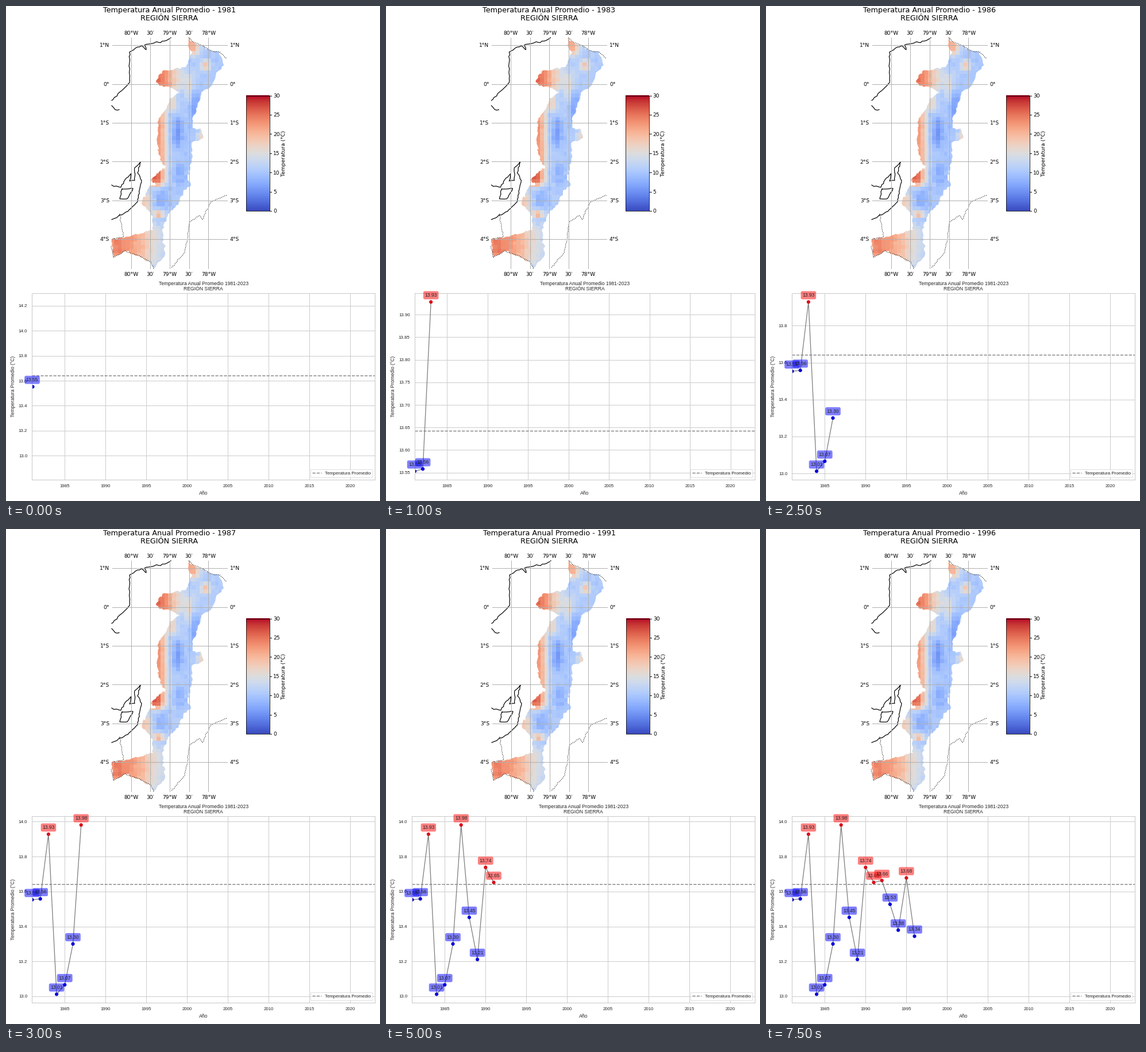
Write a matplotlib script that moves like this. It is 651 px wide and 860 px high and loops after 8 s.

```python
import numpy as np
import matplotlib.pyplot as plt
from matplotlib.animation import FuncAnimation
from matplotlib.patches import Polygon, Rectangle

W, H, DPI = 651, 860, 100
START, END, MEAN = 1981, 2023, 13.643
TEMPS = [13.553, 13.558, 13.928, 13.012, 13.066, 13.300, 13.981, 13.452,
         13.211, 13.738, 13.652, 13.663, 13.527, 13.379, 13.678, 13.344]
RED, BLUE, INK = "#d8101a", "#0000d8", "0.15"
SANS = "Liberation Sans"
DEG, X79, Y0 = 67.4, 285.0, 135.5      # pixels per degree, 79°W and the equator
LEFT, RIGHT, TOP, BOTTOM = 184.5, 385, 55, 456

# Key points of the region: east side going south, west side going north
EAST = [(318, 55), (325, 62), (340, 68), (355, 77), (372, 80), (379, 103), (366, 116),
        (361, 132), (352, 144), (340, 150), (333, 176), (324, 196), (325, 212),
        (339, 213), (343, 230), (323, 238), (325, 262), (316, 298), (322, 312),
        (309, 320), (300, 345), (282, 362), (272, 388), (277, 432), (257, 456)]
WEST = [(253, 446), (232, 434), (207, 425), (187, 437), (184, 416), (184, 405),
        (218, 399), (256, 389), (255, 365), (236, 343), (250, 312), (261, 311),
        (252, 303), (278, 278), (268, 268), (263, 236), (266, 195), (280, 176),
        (287, 160), (302, 150), (290, 143), (271, 138), (261, 132), (272, 113),
        (313, 106), (324, 80), (318, 72)]
COASTS = [
    [(287, 55), (279, 60), (241, 68), (244, 76), (236, 69), (215, 80), (215, 98),
     (215, 133), (200, 148), (184, 164)],
    [(184, 173), (190, 180), (197, 180)],
    [(184, 311), (200, 315), (207, 302), (218, 291), (215, 304), (224, 303),
     (224, 281), (234, 271), (229, 290), (236, 303), (229, 340), (212, 357), (184, 371)],
    [(202, 318), (221, 317), (211, 335), (198, 335), (202, 318)],
]
BORDERS = [
    EAST[:5] + [(384, 91)],
    [(384, 329), (356, 341), (342, 371), (337, 364), (320, 375), (311, 428), (288, 455)],
    [(198, 361), (205, 401), (184, 406)],
    [EAST[-1]] + WEST[:5],
]

# Warm and cold spots on the plateau: x, y, x radius, y radius, °C
PLATEAU = 10.5
SPOTS = [(266, 126, 34, 24, 14), (322, 62, 14, 24, 11), (346, 104, 8, 9, 7),
         (318, 144, 8, 26, 4), (265, 235, 14, 75, 12), (288, 168, 9, 16, 6),
         (298, 220, 9, 26, -5), (328, 175, 9, 30, -4), (340, 226, 8, 12, 6),
         (258, 300, 14, 14, 10), (270, 330, 12, 20, -3.5), (264, 361, 10, 8, 8),
         (240, 340, 10, 16, 8), (302, 292, 10, 18, -3), (212, 415, 50, 38, 11.5),
         (186, 420, 20, 60, 4)]

rng = np.random.default_rng(7)


def pt(px):
    return px * 72 / DPI


def rough(points, amount):
    """Break straight runs into small seeded wiggles."""
    out = []
    for a, b in zip(points, points[1:]):
        a, b = np.array(a, float), np.array(b, float)
        n = max(1, int(np.hypot(*(b - a)) // 3.5))
        steps = np.arange(n)[:, None] / n
        wiggle = rng.normal(0, amount, (n, 2))
        wiggle[0] = 0
        out.extend(a + (b - a) * steps + wiggle)
    return np.array(out + [points[-1]], float)


def temperature_grid():
    """Sum of spots on a 0.1 degree grid, with its image extent."""
    cell = DEG / 10
    cols, rows = np.arange(-15, 15), np.arange(-12, 48)
    gx, gy = np.meshgrid(X79 + cell * cols, Y0 + cell * rows)
    temp = PLATEAU + rng.normal(0, 0.5, gx.shape)
    for x, y, rx, ry, warmth in SPOTS:
        temp += warmth * np.exp(-((gx - x) / rx) ** 2 - ((gy - y) / ry) ** 4)
    extent = (X79 + cell * (cols[0] - .5), X79 + cell * (cols[-1] + .5),
              Y0 + cell * (rows[-1] + .5), Y0 + cell * (rows[0] - .5))
    return temp, extent


fig = plt.figure(figsize=(W / DPI, H / DPI), dpi=DPI, facecolor="white")
page = fig.add_axes([0, 0, 1, 1])
page.axis("off")
chart = fig.add_axes([0.1, 0.1, 0.5, 0.3])


def label(x, y, s, ha="center", size=9.2):
    return page.text(x, y + size * 0.365, s, ha=ha, va="baseline",
                     fontsize=pt(size), family="DejaVu Sans")


def note(x, y, s, **kw):
    return fig.text(x / W, 1 - y / H, s, ha="center", fontsize=pt(8.64),
                    family=SANS, color=INK, **kw)


# Map
base, extent = temperature_grid()
region = Polygon(rough(EAST + WEST + EAST[:1], 1.1), transform=page.transData)
field = page.imshow(base, extent=extent, cmap="coolwarm", vmin=0, vmax=30,
                    aspect="auto", interpolation="nearest", zorder=1)
field.set_clip_path(region)
for line in COASTS:
    page.plot(*rough(line, 0.6).T, color="black", lw=pt(1.2), zorder=2)
for line in BORDERS:
    page.plot(*rough(line, 0.6).T, color="black", lw=pt(1.1), ls=":", zorder=2)

grid = dict(color="#b0b0b0", lw=pt(1), zorder=3)
for lon in np.arange(-80, -77.5, 0.5):
    x = X79 + (lon + 79) * DEG
    page.plot([x, x], [TOP, BOTTOM], **grid)
    name = "30′" if lon % 1 else f"{-lon:.0f}°W"
    label(x, 46.5, name)
    label(x, 465.5, name)
for lat in range(-4, 2):
    y = Y0 - lat * DEG
    page.plot([LEFT, RIGHT], [y, y], **grid)
    name = f"{abs(lat)}°" + ("N" if lat > 0 else "S" if lat else "")
    label(180, y, name, "right")
    label(389.5, y, name, "left")

heading = label(284.5, 5.9, "", size=12.7)
label(284.5, 19.9, "REGIÓN SIERRA", size=12.7)

# Colour bar
BX, BR, BT, BB = 418, 459, 155.5, 356
page.imshow(np.linspace(1, 0, 256)[:, None], extent=(BX, BR, BB, BT),
            cmap="coolwarm", aspect="auto", zorder=1)
page.add_patch(Rectangle((BX, BT), BR - BX, BB - BT, fill=False, lw=pt(0.8), zorder=3))
for v in range(0, 31, 5):
    y = BB - v / 30 * (BB - BT)
    page.plot([BR, BR + 3.2], [y, y], color="black", lw=pt(0.9))
    label(465, y, v, "left")
page.text(483, 256, "Temperatura (°C)", rotation=90, ha="center", va="center",
          fontsize=pt(9.1), family="DejaVu Sans")

# Chart captions
centred = [note(0, 485.4, f"Temperatura Anual Promedio {START}-{END}"),
           note(0, 494.5, "REGIÓN SIERRA"),
           note(0, 849, "Año")]
note(12.5, 661, "Temperatura Promedio (°C)", rotation=90, va="center")


def value_range(vals):
    if len(vals) == 1:
        return vals[0] * 0.945, vals[0] * 1.055
    lo, hi = min(vals + [MEAN]), max(vals + [MEAN])
    pad = 0.05 * (hi - lo)
    return lo - pad, hi + pad


def draw_chart(vals, left, limits):
    chart.clear()
    chart.set_position([left / W, 1 - 823 / H, (642 - left) / W, 323.5 / H])
    chart.set_axisbelow(True)
    chart.grid(color="0.8", lw=pt(1))
    chart.tick_params(length=0, pad=6, labelsize=pt(7.92), labelcolor=INK,
                      labelfontfamily=SANS)
    for spine in chart.spines.values():
        spine.set(color="0.8", linewidth=pt(1.1))

    years = START + np.arange(len(vals))
    tones = [RED if v > MEAN else BLUE for v in vals]
    chart.plot(years, vals, color="gray", lw=pt(1.3), zorder=2)
    chart.scatter(years, vals, c=tones, s=pt(6.2) ** 2, lw=0, zorder=2.2)
    chart.axhline(MEAN, color="gray", ls="--", lw=pt(1.4), label="Temperatura Promedio")
    for x, v, tone in zip(years, vals, tones):
        chart.annotate(
            f"{v:.2f}", (x, v), (0, pt(7.2)), textcoords="offset points",
            ha="center", va="bottom", fontsize=pt(8.64), family=SANS, color=INK,
            bbox=dict(boxstyle="round,pad=0.3", ec="none", alpha=0.5,
                      fc="red" if tone == RED else "blue"))

    chart.set(xlim=(START, END), ylim=limits)
    key = chart.legend(loc="lower right", labelcolor=INK,
                       prop=dict(family=SANS, size=pt(7.92)))
    key.get_frame().set(edgecolor="0.8", linewidth=pt(0.8))


def update(i):
    vals = TEMPS[:i + 1]
    lo, hi = value_range(vals)
    # A narrow range has two-decimal tick labels, which push the layout aside
    wide = hi - lo < 0.5
    left = 50 if wide else 45.5
    draw_chart(vals, left, (lo, hi))
    for t in centred:
        t.set_x((left + 642) / 2 / W)
    shift = 0.6 if wide else 0
    page.set(xlim=(shift, W + shift), ylim=(H, 0))
    heading.set_text(f"Temperatura Anual Promedio - {START + i}")
    field.set_data(base + vals[-1] - MEAN)
    return []


anim = FuncAnimation(fig, update, frames=len(TEMPS), interval=500,
                     repeat=True, repeat_delay=0, init_func=lambda: update(0), blit=False)
plt.show()
```
